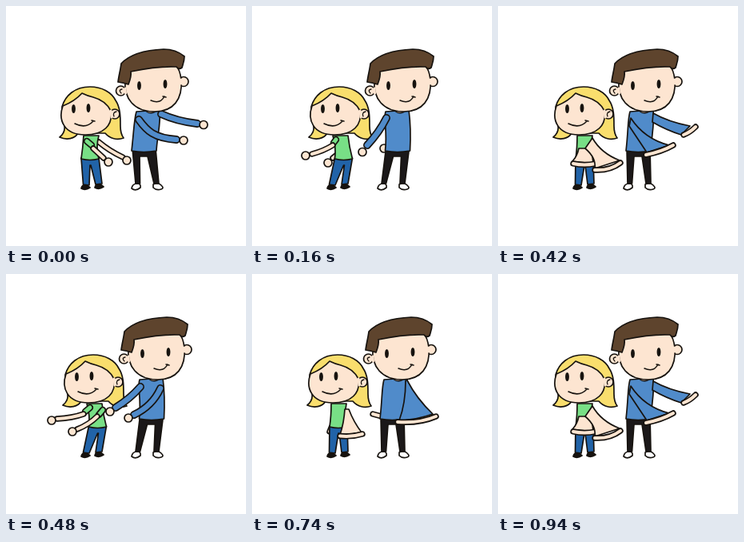
An HTML page that plays this animation: 300 px wide and 300 px high, repeating every 0.98 s.

```html
<!DOCTYPE html>
<html lang="en">
<head>
<meta charset="utf-8">
<title>Arm swing dance</title>
<style>
  html, body { margin: 0; width: 100%; height: 100%; overflow: hidden; background: #fff; }
  svg { display: block; width: 100vw; height: 100vh; overflow: hidden; }
  path { stroke-linecap: round; stroke-linejoin: round; }
  /* The poses stand side by side; the strip jumps from one to the next. */
  #strip { animation: dance 980ms step-end infinite; }
  @keyframes dance {
    0%, 32.65% { transform: translateX(0); }
    10.2%, 29.59%, 42.85%, 95.91% { transform: translateX(-300px); }
    13.26%, 26.53% { transform: translateX(-600px); }
    16.32% { transform: translateX(-900px); }
    45.91%, 59.18%, 78.57%, 92.85% { transform: translateX(-1200px); }
    48.97%, 82.65% { transform: translateX(-1500px); }
    62.24%, 75.51% { transform: translateX(-1800px); }
    66.32% { transform: translateX(-2100px); }
    100% { transform: translateX(0); }
  }
</style>
</head>
<body>
<svg viewBox="0 0 300 300"><g id="strip"></g></svg>
<script>
const INK = '#17130f', SKIN = '#fde5d1', BLUE = '#508bca', GREEN = '#78df86',
      JEANS = '#2163a8', PANTS = '#1b1819', BLOND = '#f9de6d', BROWN = '#5e442d';

const shape = (d, fill = 'none', w = 1.7) =>
  `<path d="${d}" fill="${fill}" stroke="${INK}" stroke-width="${w}"/>`;
const line = (d, color, w) =>
  `<path d="${d}" fill="none" stroke="${color}" stroke-width="${w}"/>`;
const tube = (d, color, w) => line(d, INK, w + 3.4) + line(d, color, w);
const dot = (x, y, r) =>
  `<circle cx="${x}" cy="${y}" r="${r}" fill="${SKIN}" stroke="${INK}" stroke-width="1.7"/>`;
const eye = (x, y) => `<ellipse cx="${x}" cy="${y}" rx="2.4" ry="5.6" fill="${INK}"/>`;
const move = (x, body) => `<g transform="translate(${x} 0)">${body}</g>`;

const arm = (d, color, w, x, y) => tube(d, color, w) + dot(x, y, 5);
const blur = (wedge, color, palm) => shape(wedge, color) + tube(palm, SKIN, 4);
const sleeve = d => tube(d, GREEN, 5);

const girlHead =
  shape('M69 164C74 160 76 156 75 150L72 126C76 112 88 101 107 101C122 101 134 108 139 118C145 127 145 138 145 150C145 157 146 161 149 165C141 168 132 166 126 159L92 159C88 166 78 168 69 164Z', BLOND) +
  dot(138, 135, 6) +
  shape('M73 125C67 142 74 161 101 161C124 161 136 149 133 131C129 123 122 117 111 114Q103 112 97 109Q88 119 73 125Z', SKIN) +
  line('M133 131L134 139', SKIN, 3) + shape('M140 132Q135 133 137 138', 'none', 1.3) +
  eye(86.5, 128.5) + eye(105, 127.5) +
  shape('M88 147Q102 154 111 144M109 143L113 144', 'none', 1.5);

const manHead =
  dot(145.5, 106, 6) + dot(224, 94.5, 6) +
  shape('M151 92C149 116 162 132 188 132C211 132 223 117 221 92C219 76 214 70 200 72L160 78Z', SKIN) +
  line('M151 103L151.5 109', SKIN, 3) + line('M221 92L221 97', SKIN, 3) +
  shape('M142 95C143 87 145 80 146 72C157 60 176 55 199 54C209 54 218 57 225 63C225 69 223 73 222 77Q218 80 215 76C195 75 177 78 158 82C159 88 157 93 155 98Q149 96 142 95Z', BROWN) +
  shape('M147 104Q142 105 146 109', 'none', 1.3) +
  eye(168.5, 99.5) + eye(201, 97.5) +
  shape('M183 118Q195 123 200 113M198 113L202 114', 'none', 1.5);

function girl(hip, tilt, back, front) {
  const l = 97 + hip, r = 119 + hip;
  return back +
    shape('M94 228Q95 223 100 223L105 227Q99 231 94 228ZM111 227Q112 222 117 222L122 226Q116 230 111 227Z', INK) +
    shape(`M${l} 190L96.5 223L104 224L${l + 11} 199L${l + 12} 199L112 223L120 222L${r} 190Z`, JEANS) +
    shape(`M${99 + tilt} 162Q${l + 2} 178 ${l} 191Q${l + 11} 194 ${r} 191Q${r - 4} 176 ${118 + tilt} 162Z`, GREEN) +
    front + move(tilt, girlHead);
}

function man(hip, tilt, back, front) {
  const l = 160 + hip, r = 191 + hip;
  return back +
    shape('M157 228Q158 222 164 222Q169 222 168 227Q162 232 157 228ZM184 223Q190 220 194 224Q198 228 194 229Q188 231 184 227Z', '#fff') +
    shape(`M${l + 1} 178L162 222L167.5 222L${l + 10} 188L${l + 20} 188L185 222L191 222L${r - 1} 178Z`, PANTS) +
    shape(`M${165 + tilt} 132C${162 + tilt} 142 ${l + 3} 155 ${l} 181Q${l + 15} 184 ${r} 181C${r + 1} 163 ${196 + tilt} 145 ${194 + tilt} 130Z`, BLUE) +
    shape(`M${176 + tilt} 131Q${184 + tilt} 137 ${191 + tilt} 130`, SKIN, 1.3) +
    front + move(tilt, manHead);
}

const RIGHT = [-3, -2], MID = [0, 0], LEFT = [6.5, 2];

// Each pose: lean, then hidden and visible arms of the girl and the man.
const poses = [
  [RIGHT,
    arm('M116 170Q129 181 146 189', SKIN, 4, 151, 193),
    sleeve('M101 169L107 174') + arm('M109 178L122 190', SKIN, 4, 128, 195),
    '',
    arm('M194 135C207 141 222 145 239 147', BLUE, 6.5, 247, 148.5) +
    arm('M166 142C176 156 185 165 213 167', BLUE, 6.5, 222, 168)],
  [MID, '',
    blur('M101 178Q99 188 93 194L119 197L117 178Z', SKIN, 'M94 197Q108 200 122 197') +
    blur('M118 165C126 179 139 188 152 193L121 203Q123 190 109 178Z', SKIN, 'M121 205Q140 206 153 196'),
    '',
    blur('M194 134C208 142 224 147 240 150L229 161Q210 155 193 145Z', BLUE, 'M232 161Q240 158 247 151') +
    blur('M166 140C177 157 194 169 214 174L186 183Q176 168 164 150Z', BLUE, 'M185 186Q205 182 219 174')],
  [MID,
    tube('M118 193L122 197', SKIN, 4),
    blur('M100 170Q87 183 78 196L105 200Q109 188 107 174Z', SKIN, 'M76 197Q90 205 107 203'),
    tube('M190 179L201 174', SKIN, 4),
    blur('M165 134Q148 155 130 174L172 183Q169 152 167 134Z', BLUE, 'M126 177Q148 188 176 185')],
  [LEFT,
    arm('M106 186L101 190', SKIN, 4, 95, 196),
    sleeve('M105 167L102 171') + arm('M101 174Q90 181 75 185', SKIN, 4, 67, 187),
    dot(165, 178, 5),
    arm('M168 140Q159 158 144 174', BLUE, 6.5, 138, 182.5)],
  [MID, '',
    blur('M103 166Q92 178 77 188L92 192Q100 181 108 171Z', SKIN, 'M71 190Q81 191 91 194') +
    blur('M116 168Q109 185 98 201L115 200Q118 186 121 170Z', SKIN, 'M95 205Q105 206 115 202'),
    '',
    blur('M164 136Q154 153 142 165L152 173Q166 160 174 142Z', BLUE, 'M139 167Q144 168 149 173') +
    blur('M188 136Q178 160 156 177L184 185Q193 160 192 140Z', BLUE, 'M152 178Q167 186 183 186')],
  [LEFT, '',
    sleeve('M105 167L99 172') + arm('M97 175Q83 180 64 181', SKIN, 4, 57, 183) +
    sleeve('M121 170L116 176') + arm('M114 178Q104 188 89 194', SKIN, 4, 83, 197),
    '',
    arm('M168 141Q155 156 137 167', BLUE, 6.5, 130, 172) +
    arm('M193 143Q183 165 160 176', BLUE, 6.5, 153, 180)],
  [MID,
    tube('M99 192L97 197', SKIN, 4),
    blur('M116 169Q115 186 110 201L137 198Q127 185 121 169Z', SKIN, 'M110 202.5Q125 204 138 200'),
    tube('M151 175L162 178', SKIN, 4),
    blur('M192 133Q192 162 184 183Q207 182 226 175Q206 156 194 133Z', BLUE, 'M182 185Q209 187 230 178')],
  [RIGHT,
    arm('M113 188L119 192', SKIN, 4, 124, 195),
    sleeve('M114 168L119 173') + arm('M120 175Q130 184 143 187', SKIN, 4, 149, 190),
    dot(192, 178, 5),
    arm('M192 138Q206 157 222 171', BLUE, 6.5, 229, 178)]
];

document.getElementById('strip').innerHTML = poses.map(
  ([[hip, tilt], gBack, gFront, mBack, mFront], i) =>
    move(i * 300, girl(hip, tilt, gBack, gFront) + man(hip, tilt, mBack, mFront))
).join('');
</script>
</body>
</html>
```
